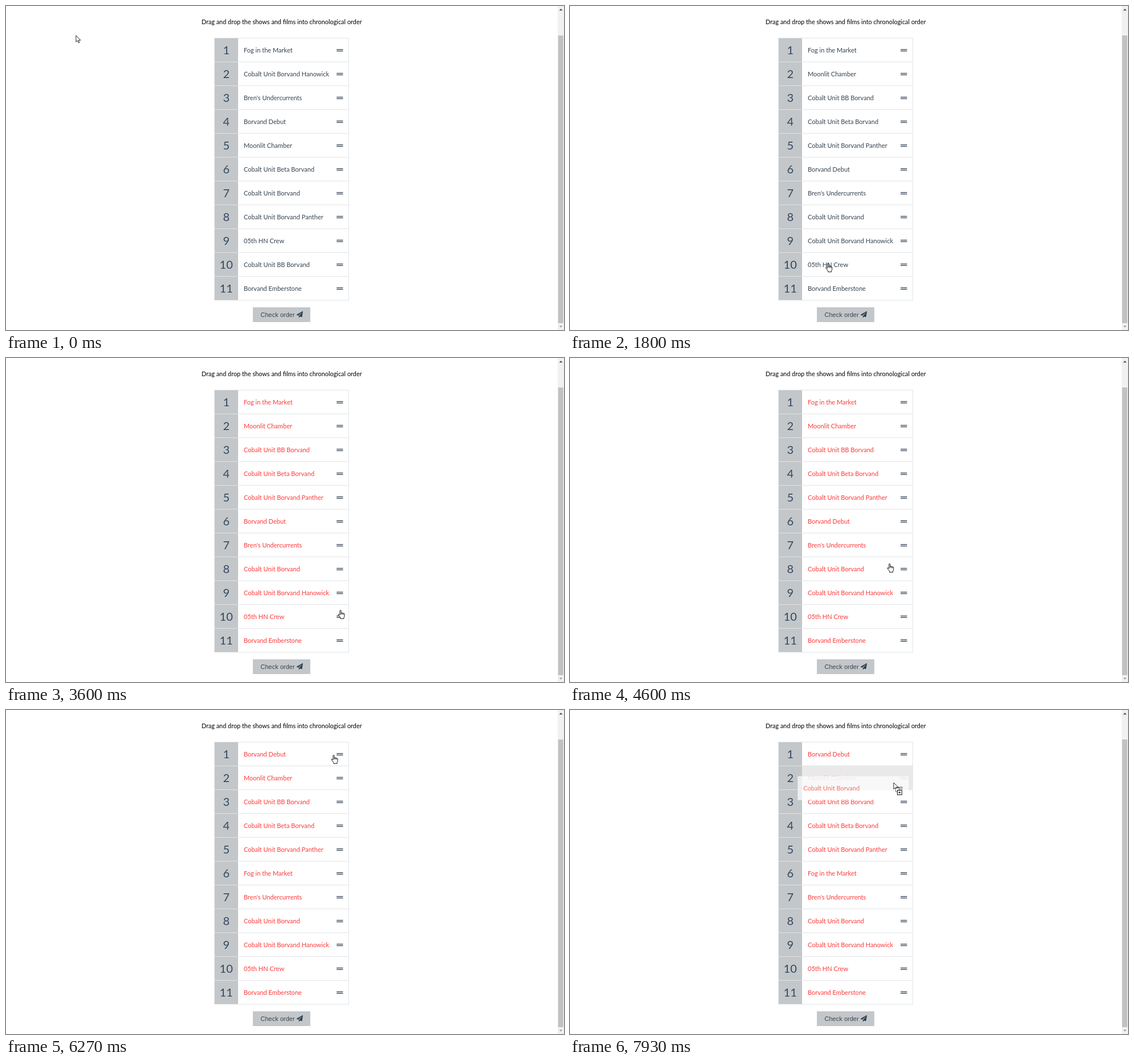
These frames come from a looping animation (981x571 px, 8000 ms). An HTML page:

```html
<!DOCTYPE html>
<html lang="en">
<head>
<meta charset="utf-8">
<title>Chronological order quiz</title>
<style>
  html, body { margin: 0; width: 100%; height: 100%; overflow: hidden; background: #fff; }
  svg { display: block; }
  text { font: 11.05px Lato, sans-serif; fill: #34424f; }
  .title { font-size: 10.9px; fill: #000; text-anchor: middle; }
  .num { font-size: 20px; fill: #34495e; text-anchor: middle; }
  .button { font-family: "Liberation Sans", Arial, sans-serif; fill: #3c4650; }
  .red .name { fill: #ff3838; }
  .grip { fill: #2c3e50; }
  .over .cell { fill: #e9e9e9; }
  .over .content { opacity: .3; }
  .cursor { fill: #fff; stroke: #000; }
</style>
</head>
<body>
<svg width="981" height="571" viewBox="0 0 981 571">
  <text class="title" x="484.7" y="32">Drag and drop the shows and films into chronological order</text>

  <g id="quiz">
    <rect x="366" y="57" width="42" height="462" fill="#c3c7ca"/>
    <g id="rows"></g>
    <rect x="366.5" y="56.5" width="236" height="462" fill="none" stroke="#e1e4e6"/>
    <rect x="434" y="531" width="101" height="26" fill="#c3c7ca"/>
    <text class="button" x="447.5" y="547.7">Check order</text>
    <path transform="translate(511 538) scale(.0215)" fill="#2c3e50" d="M476 3L12 271c-18 10-16 35 2 43l107 44 287-253c6-5 14 3 9 9L176 407v80c0 24 29 33 43 16l63-77 125 52c14 6 30-3 33-18l72-432C515 8 493-7 476 3z"/>
  </g>

  <rect x="970" width="11" height="571" fill="#f1f1f1"/>
  <rect x="970.7" y="52" width="9" height="507" fill="#c1c1c1"/>
  <path d="M972.5 8L975.5 4.8 978.5 8Z" fill="#505050"/>
  <path d="M972.5 563.5H978.5L975.5 566.7Z" fill="#a0a0a0"/>

  <g id="ghost" class="red" opacity=".7"></g>
  <g id="cursor" class="cursor">
    <path id="hand" transform="translate(-4.5) scale(.7)" stroke-width="1.3" d="M5 2.5Q5 .6 6.5 .6T8 2.5V8Q8 7 9.5 7T11 8.5Q11 7.5 12.5 7.7T14 9.2Q14.2 8.3 15.3 8.6T16.5 10.5V15Q16.5 17 15 19V22H6.5V19.5L2.5 14.5Q.5 12 1 11.2 2 10 3.5 11.5L5 13ZM8 8V11.5M11 8.5V11.8M14 9.2V12"/>
    <path id="arrow" transform="scale(.7)" stroke-width="1.2" d="M0 0V16.3L3.8 12.7 6.3 18.4 8.7 17.4 6.3 11.8H11.5Z"/>
    <g id="copy" stroke-width=".9">
      <rect x="3.5" y="9.5" width="6" height="6.5" stroke-dasharray="1.2 .8"/>
      <rect x="6.5" y="13.5" width="8" height="8"/>
      <path d="M8.5 17.5H12.5M10.5 15.5V19.5"/>
    </g>
  </g>
</svg>
<script>
const $ = id => document.getElementById(id);
const show = (el, on) => el.setAttribute('visibility', on ? 'visible' : 'hidden');

const TOP = 57, ROW = 42, STEPS = 120, RATE = 15, LAG = 1.25;
const RELOAD = 18, READY = 21, CHECKED = 34;

const names = [
  'Fog in the Market', 'Cobalt Unit Borvand Hanowick', 'Bren\'s Undercurrents',
  'Borvand Debut', 'Moonlit Chamber', 'Cobalt Unit Beta Borvand',
  'Cobalt Unit Borvand', 'Cobalt Unit Borvand Panther', '05th HN Crew',
  'Cobalt Unit BB Borvand', 'Borvand Emberstone'
];
const shuffled = [0, 4, 9, 5, 7, 3, 2, 6, 1, 8, 10].map(i => names[i]);
const drags = [
  { from: 77, to: 94, row: 5, drop: 0 },
  { from: 112, to: 120, row: 7, drop: 1 }
];

// Pointer moves: start step, end step, x, y, sideways bow
const moves = [
  [0, 1, 110, 21],
  [1, 21, 253, 190],
  [21, 33, 484.5, 541, 27],
  [33, 36, 484.5, 538.5],
  [44, 50, 588, 444],
  [54, 60, 596, 498],
  [60, 66, 588, 456],
  [66, 75, 572, 287, -20],
  [77, 89, 571, 79, -2],
  [93, 94, 576, 79],
  [97, 107, 582, 384, -18],
  [107, 109, 577, 370],
  [112, 119, 569, 128]
];

function pointer(k) {
  let x = 123, y = 52;
  for (const [from, to, tx, ty, bow = 0] of moves) {
    if (k <= from) break;
    const f = Math.min(1, (k - from) / (to - from));
    const ease = 1 - (1 - f) ** 2;
    x += (tx - x) * ease + bow * Math.sin(Math.PI * f);
    y += (ty - y) * ease;
  }
  return [x, y];
}

function listAt(k) {
  if (k < READY) return names;
  const list = [...shuffled];
  for (const { to, row, drop } of drags) {
    if (k >= to) [list[row], list[drop]] = [list[drop], list[row]];
  }
  return list;
}

const cell = y => `
  <rect class="cell" x="408" y="${y}" width="195" height="${ROW}" fill="#fff"/>
  <g class="content">
    <text class="name" x="418" y="${y + 24.8}"></text>
    <path class="grip" d="M581.2 ${y + 18.9}h11.3v1.4h-11.3zm0 2.8h11.3v1.4h-11.3z"/>
  </g>`;

$('rows').innerHTML = names.map((_, i) => {
  const y = TOP + i * ROW;
  return `<g class="row">${cell(y)}
    <text class="num" x="387.2" y="${y + 28.3}">${i + 1}</text>
    <rect x="366" y="${y + ROW - 1}" width="237" height="1" fill="#e1e4e6"/></g>`;
}).join('');
$('ghost').innerHTML = cell(0);

const rows = [...document.querySelectorAll('.row')];
const labels = rows.map(r => r.querySelector('.name'));
const ghostLabel = $('ghost').querySelector('.name');

function draw(k) {
  const [x, y] = pointer(k);
  const list = listAt(k);
  const drag = drags.find(d => k > d.from && k < d.to);
  const over = drag ? Math.floor((y - TOP) / ROW) : -1;

  show($('quiz'), k < RELOAD || k >= READY);
  $('rows').setAttribute('class', k >= CHECKED ? 'red' : '');
  rows.forEach((row, i) => {
    labels[i].textContent = list[i];
    row.classList.toggle('over', i === over && i !== drag.row);
  });

  show($('ghost'), drag);
  if (drag) {
    // The drag image trails behind the pointer.
    const [x0, y0] = pointer(drag.from);
    const [gx, gy] = pointer(Math.max(drag.from, k - LAG));
    ghostLabel.textContent = list[drag.row];
    $('ghost').setAttribute('transform',
      `translate(${gx - x0} ${TOP + drag.row * ROW + gy - y0})`);
  }

  const inList = x >= 366 && x < 603 && y >= TOP && y < 519;
  const inButton = x >= 434 && x < 535 && y >= 531 && y < 557;
  const hand = !drag && (inList || inButton);
  const visible = k < 2 || k >= READY;
  $('cursor').setAttribute('transform', `translate(${x} ${y})`);
  show($('hand'), visible && hand);
  show($('arrow'), visible && !hand);
  show($('copy'), drag);
}

const start = performance.now();
let last = -1;
function tick() {
  const t = performance.now() - start;
  const k = Math.floor((t + 5) * RATE / 1000) % STEPS;
  if (k !== last) draw(last = k);
  requestAnimationFrame(tick);
}
tick();
</script>
</body>
</html>
```
